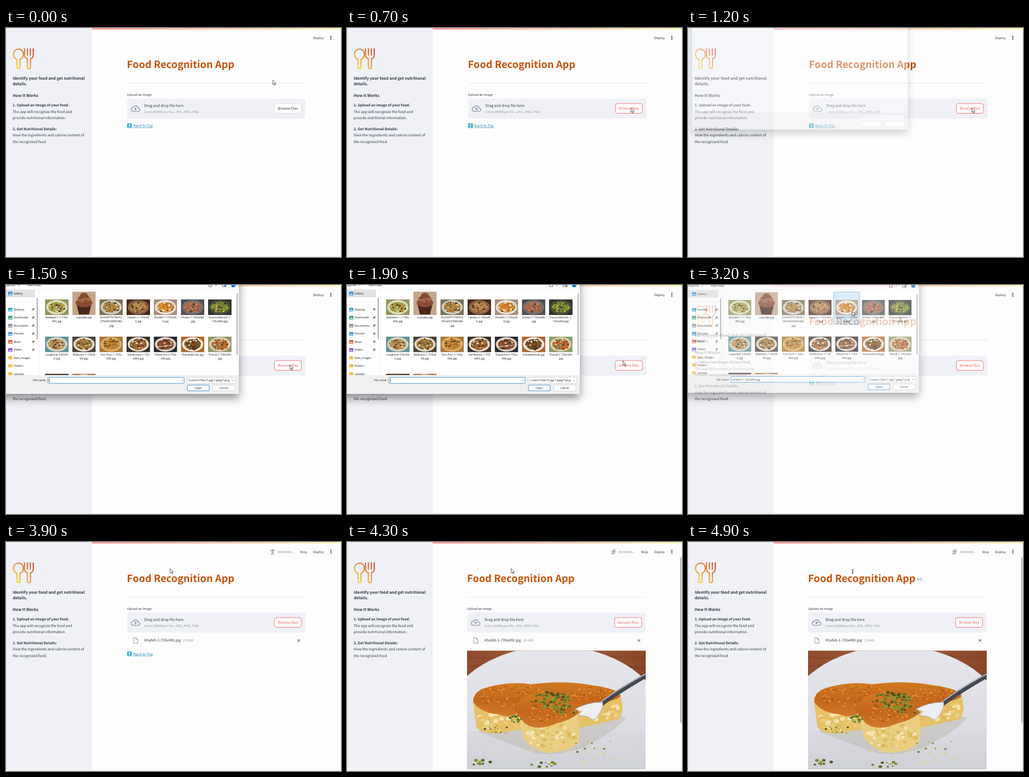
These frames come from a looping animation (600 by 412 pixels, 5000 ms). An HTML page:

```html
<!DOCTYPE html>
<html lang="en">
<head>
<meta charset="utf-8">
<title>Food Recognition App</title>
<style>
  html, body { margin: 0; height: 100%; overflow: hidden; background: #fff; }
  svg { text-rendering: geometricPrecision; }
  #stage { display: block; width: 100vw; height: 100vh; }
  text { font-family: "Noto Sans CJK JP", "Noto Sans CJK SC", "Noto Sans CJK", Lato, sans-serif; fill: #31333f; }
  #dialog text { font-family: "Open Sans", "Noto Sans", sans-serif; font-size: 5px; fill: #111; }
  #frame { filter: drop-shadow(0 8px 8px rgba(0, 0, 0, .42)); }
</style>
</head>
<body>
<svg id="stage" viewBox="0 0 600 412"></svg>
<script>
const BODY = 6.45, SMALL = 5.62, GREY = '#91949c', RED = '#f05a5a';

const text = (x, y, str, size = BODY, attrs = '') =>
  `<text x="${x}" y="${y}" font-size="${size}" ${attrs}>${str}</text>`;
const bold = (x, y, str, size = 7.05) => text(x, y, str, size, 'font-weight="700"');
const rect = (x, y, w, h, fill, attrs = '') =>
  `<rect x="${x}" y="${y}" width="${w}" height="${h}" fill="${fill}" ${attrs}/>`;
const ellipse = (x, y, rx, ry, fill, attrs = '') =>
  `<ellipse cx="${x}" cy="${y}" rx="${rx}" ry="${ry}" fill="${fill}" ${attrs}/>`;
const path = (d, fill = 'none', stroke = 'none', width = 1, attrs = '') =>
  `<path d="${d}" fill="${fill}" stroke="${stroke}" stroke-width="${width}" ${attrs}/>`;
const group = (id, body, attrs = '') => `<g id="${id}" ${attrs}>${body}</g>`;

let seed = 7;
const random = () => (seed = (seed * 16807) % 2147483647) / 2147483647;

function specks(count, x, y, rx, ry, size, colours) {
  let out = '';
  for (let i = 0; i < count; i++) {
    const a = random() * 6.283, d = Math.sqrt(random()), r = size * (.5 + random());
    out += ellipse((x + Math.cos(a) * d * rx).toFixed(1), (y + Math.sin(a) * d * ry).toFixed(1),
      r.toFixed(2), (r * .75).toFixed(2), colours[i % colours.length]);
  }
  return out;
}

// ---- page ----
function sidebar() {
  const spoon = 'M19.6 56.5C10.5 53.5 11.5 38 22.3 38S34 53.5 25 56.5V70.5a2.7 2.7 0 0 1-5.4 0Z';
  const fork = 'M33.2 37.5V49q0 5 5 6.2V70.5a2.8 2.8 0 0 0 5.6 0V55.2q5-1.2 5-6.2V37.5M38.4 37.5V49M43.6 37.5V49';
  return rect(0, 0, 153.5, 411, '#eff1f6') +
    path(spoon + fork, 'none', 'url(#warm)', 2, 'stroke-linejoin="round" stroke-linecap="round"') +
    bold(12, 93, 'Identify your food and get nutritional') + bold(12, 103, 'details.') +
    bold(12, 123.6, 'How It Works') +
    bold(12, 141.4, '1. Upload an image of your food.', 6.35) +
    text(12, 152.8, 'The app will recognize the food and') +
    text(12, 164.3, 'provide nutritional information.') +
    bold(12, 183.6, '2. Get Nutritional Details:', 6.35) +
    text(12, 195, 'View the ingredients and calorie content of') +
    text(12, 206.6, 'the recognized food.');
}

const CLOUD = 'M19.35 10.04A7.49 7.49 0 0 0 12 4C9.11 4 6.6 5.64 5.35 8.04A6 6 0 0 0 0 14c0 3.31 2.69 6 6 6h13' +
  'c2.76 0 5-2.24 5-5 0-2.64-2.05-4.78-4.65-4.96zM19 18H6c-2.21 0-4-1.79-4-4 0-2.05 1.53-3.76 3.56-3.97' +
  'l1.07-.11.5-.95A5.47 5.47 0 0 1 12 6c2.62 0 4.88 1.86 5.39 4.43l.3 1.5 1.53.11A2.98 2.98 0 0 1 22 15' +
  'c0 1.65-1.35 3-3 3zM8 13h2.55v3h2.9v-3H16l-4-4z';

function content() {
  const link = '<g fill="none" stroke="#8d9097" stroke-width=".9">' +
    '<path d="M415 65.2h-1.6a1.9 1.9 0 0 0 0 3.8h1.6M417 65.2h1.6a1.9 1.9 0 0 1 0 3.8H417M414 67.1h4"/></g>';
  return text(216.6, 72, 'Food Recognition App', 17.9, 'font-weight="700" style="fill:#c7520c"') +
    group('anchor', link) +
    rect(217, 99, 319, .8, '#dfe0e5') +
    text(216.6, 122, 'Upload an image', SMALL) +
    rect(216.6, 127, 319.6, 36, '#eff1f6', 'rx="3.5"') +
    path(CLOUD, '#959cac', 'none', 0, 'transform="translate(223.4 136.4) scale(.71)"') +
    text(247.8, 142.3, 'Drag and drop file here', 6.6) +
    text(247.8, 153.2, 'Limit 200MB per file • JPG, JPEG, PNG', SMALL, `style="fill:${GREY}"`) +
    rect(480.8, 136, 48.3, 17.5, '#fff', 'id="button" rx="3.4" stroke-width=".8"') +
    text(505, 147.3, 'Browse files', BODY, 'id="buttonText" text-anchor="middle"') +
    group('file',
      path('M228.4 172.2h4.6l3 3v7h-7.6zM232.8 172.2v3.2h3.2', 'none', '#959cac', 1) +
      text(247.8, 179.4, 'Khafeh-1-735x490.jpg') +
      text(317.3, 179.4, '22.6KB', SMALL, `style="fill:${GREY}"`) +
      path('M522 175l4.6 4.6m0-4.6l-4.6 4.6', 'none', '#31333f', 1)) +
    group('backLink',
      rect(217, 171.5, 8.4, 8.6, '#35aecb', 'rx="1"') +
      path('M221.2 172.6l2 2.3h-1.3v2.3h-1.4v-2.3h-1.3z', '#fff') +
      rect(218.4, 178, 5.6, .8, '#d8f2f8') +
      text(228, 178.2, 'Back to Top', BODY, 'style="fill:#1a80b5" text-decoration="underline"')) +
    group('photo', photo());
}

function photo() {
  const greens = ['#5d6d22', '#7d8a2e', '#46551a', '#8f9638'];
  const baked = ['#dd8a2c', '#b4560f', '#e09638', '#c66a18'], crumb = ['#f4e4b0', '#dfbc63', '#ecd080'];
  return '<svg x="216.5" y="195.5" width="320" height="213" viewBox="215 195.5 320 213">' +
    rect(215, 195, 320, 214, 'url(#wood)') +
    path('M215 206q50 9 90-8M440 198q45 14 95 8M215 224l44-4M478 222l57 6', 'none', '#6b301b', 1.2, 'opacity=".5"') +
    ellipse(371, 332, 200, 145, 'url(#plate)') + rect(215, 340, 320, 70, 'url(#plateBase)') +
    path('M236 342Q300 366 316 372Q350 392 418 372Q480 342 500 316L430 300L250 310Z', '#b9b3a8', 'none', 0, 'opacity=".45"') +
    path('M226 288Q226 268 250 262Q290 250 330 256Q390 248 440 258Q486 264 490 277Q497 302 488 318L450 327L410 336L316 336L288 341Q250 350 232 334Z', '#e6c165') +
    specks(40, 268, 322, 36, 17, 3.4, crumb) + specks(35, 458, 304, 32, 16, 3.4, crumb) +
    path('M226 288Q226 268 250 262Q290 250 330 256Q390 248 440 258Q486 264 490 277Q480 288 440 290L410 300L304 308Q290 318 272 310Q240 308 226 288Z', 'url(#crust)') +
    specks(150, 300, 278, 64, 20, 1.7, baked) + specks(70, 440, 273, 45, 12, 1.7, baked) +
    path('M303 304L412 309Q421 340 412 364Q388 380 356 379Q328 372 316 352Z', '#e9cd80') +
    specks(75, 365, 350, 43, 22, 3.4, crumb) +
    path('M300 303Q306 280 330 274Q386 270 416 307Q398 322 376 326Q340 342 318 326Z', 'url(#crust)') +
    specks(110, 355, 305, 44, 20, 1.6, baked) +
    path('M538 239Q490 266 452 294', 'none', '#44474d', 8) +
    path('M538 236Q488 262 452 290', 'none', '#a9adb4', 2.2) +
    path('M458 288Q430 288 408 301L420 305L414 312L430 314L440 320Q450 318 458 296Z', '#eceef1', '#8d9299', .7) +
    specks(110, 366, 286, 38, 16, 2.2, greens) + specks(25, 392, 302, 18, 10, 2, greens) +
    specks(22, 302, 318, 10, 7, 2, greens) + specks(12, 270, 338, 24, 8, 1.6, greens) +
    specks(12, 360, 401, 30, 6, 2.2, greens) + specks(12, 242, 398, 16, 9, 2.4, greens) +
    specks(10, 425, 365, 50, 18, 1.6, greens) + specks(30, 400, 384, 90, 18, 2, ['#d9cf9c', '#ddd6b0']) + '</svg>';
}

function header() {
  return text(550, 20, 'Deploy', 5.8) +
    [14.9, 17.6, 20.3].map(y => ellipse(581.8, y, 1, 1, '#31333f')).join('') +
    group('running',
      group('man', '') + text(487, 20, 'RUNNING...', SMALL, `style="fill:${GREY}"`) + text(526.5, 20, 'Stop', 5.8)) +
    rect(596.6, 28, 2.6, 297, '#b3b5ba', 'id="scrollbar" rx="1.3"');
}

// ---- file dialog ----
const COLUMN = 48.65;
// label lines | background, plate, food, garnish
const PICTURES = [
  'Balaleet-1-1-735x/490.jpg|#8f9658 #e0dcc4 #b5a044 #6f8f35',
  'cupcake.jpg|#c4a68c #d5bda6 #8a4d32 #a3674a',
  'DLPGFPTVTRVFO/ZPH4I5YXW43RA/.jpg|#7a7050 #cdd0c8 #b5803a #6d7434',
  'Harees-1-735x49/0.jpg|#45291d #8a6040 #b98a52 #5a3522',
  'Khafeh-1-735x49/0.jpg|#a98f7c #e6e3de #d88f2e #c06a1c',
  'Khubz-1-735x486/.jpg|#4f4d50 #77706c #a8664a #c48a70',
  'Kousa-Mahshi-1-/735x490.jpg|#2f352c #48533c #7d8c34 #c9bb4a',
  'Luqaimat-720x54/0.jpg|#5f9297 #d8d4c4 #b98f50 #85623a',
  'Majboos-1-735x4/90.jpg|#4a4339 #e4ddd0 #a5752f #5d6430',
  'Puri-Puri-1-735x/490.jpg|#a87838 #dbb06a #c08432 #8a5220',
  'Samboosa-1-735/x493.jpg|#3a3028 #e4ded2 #a8652a #6d5a34',
  'Shwarma-1-735x/490.jpg|#2c2a30 #e0d8cc #84482a #b98a58',
  'thareedsmall.jpg|#b4652e #f0ece4 #80501f #4a3418',
  'Tharid-1-735x504/.jpg|#8f9a68 #dcd0b4 #bf6a34 #637f34',
  '|#4a3028 #5d3c30 #7a4e3a #9b6a50',
  '|#a8744c #e0d0a8 #c8a048 #84502c'
];

function thumbnail(entry, i) {
  const [label, colours] = entry.split('|'), [back, plate, food, garnish] = colours.split(' ');
  const cx = 91 + (i % 7) * COLUMN, row = Math.floor(i / 7), tall = i === 1;
  const top = tall ? 12 : 26 + row * 66.8;
  const dish = tall
    ? path('M8 24h26l-4 17H12z', '#4a271a') + ellipse(21, 20, 15, 8, food) + ellipse(21, 13, 12, 6, garnish) + ellipse(21, 7, 7, 5, food)
    : ellipse(21, 14, 19, 13, plate) + ellipse(21, 14, 15, 9.5, food);
  const garnishes = tall ? specks(20, 21, 15, 12, 8, 1.2, [garnish, '#6b3822'])
    : specks(45, 21, 14, 15, 10, 1.5, [garnish, food, plate, '#4a321e']);
  const image = `<svg x="${cx - 21}" y="${top}" width="42" height="${tall ? 42 : 28}">` +
    rect(0, 0, 42, 42, back) + dish + garnishes + '</svg>';
  return image + label.split('/').map((line, n) =>
    text(cx, 60.2 + row * 66.8 + n * 7.2, line, 5, 'text-anchor="middle"')).join('');
}

function dialog() {
  const places = [['Gallery', 15, '#2f8fd6'], ['Desktop', 44, '#25a3d6'], ['Downloads', 58.5, '#2f9a6a'],
    ['Documents', 73, '#7f8ba0'], ['Pictures', 87.5, '#3a8fd8'], ['Music', 102, '#e0553c'],
    ['Videos', 116.5, '#8a4ad0'], ['Data_Images', 131, '#f2c24a'], ['Posters', 145.5, '#f2c24a'], ['uploads', 160, '#f2c24a']];
  const list = rect(-6, 8.5, 58, 13.5, '#e2e2e4') + rect(0, 29.8, 52, .6, '#e3e3e3') +
    places.map(([name, y, colour], i) =>
      rect(4, y - 3, 7.4, i > 6 ? 5.6 : 6.4, colour, 'rx="1"') +
      (i > 6 ? '' : path(`M5 ${y + 2.2}l2-2.6 1.4 1.4 1-.8 1.4 2z`, '#fff', 'none', 0, 'opacity=".85"')) +
      text(13.4, y + 1.8, name) +
      (i > 0 && i < 7 ? path(`M47.4 ${y - 1.4}l2.6 2.6m-1.2-3.2l2 2m-2.6.6l-1.4 1.6`, 'none', '#555', 1.1) : '')).join('');
  const toolbar = text(-4, 2.3, 'Organize') + path('M21.5 0l1.5 1.5 1.5-1.5', 'none', '#333', .6) + text(38, 2.3, 'New folder') +
    rect(363.5, -3, 5, 6, 'none', 'stroke="#444" stroke-width=".8"') + path('M374.5 0l1.5 1.5 1.5-1.5', 'none', '#333', .6) +
    rect(387.6, -3, 6.4, 6, 'none', 'stroke="#444" stroke-width=".8"') + rect(391, -3, 3, 6, '#3a8fd8') +
    ellipse(407, .4, 3.8, 3.8, '#1679cf') + rect(-16, 7.6, 433, .6, '#e6e6e6');
  const bars = rect(59.2, 8, .6, 154, '#e6e6e6') + rect(55.2, 23, 1.5, 75, '#8f8f8f', 'rx=".7"') +
    rect(413.2, 15, 1.5, 111, '#9a9a9a', 'rx=".7"');
  const box = (x, y, w, h, line, fill = '#fff') => rect(x, y, w, h, fill, `stroke="${line}" stroke-width=".8" rx="1"`);
  const footer = rect(-16, 162, 433, 34, '#f0f0f0') +
    box(324.5, 166.2, 86.5, 10.8, '#d0d0d0') + box(325, 180, 39, 10.4, '#d0d0d0') + box(370.5, 180, 39.5, 10.4, '#d0d0d0');
  const captions = box(75, 166.2, 244, 10.8, '#2a86cf') + box(325, 180, 39, 10.4, '#2a86cf', '#fcfdff') +
    text(72, 173.4, 'File name:', 5, 'text-anchor="end"') + text(327, 173.4, 'Custom Files (*.jpg;*.jpeg;*.png') +
    path('M313.5 170.8l1.6 1.6 1.6-1.6M404.8 170.8l1.6 1.6 1.6-1.6', 'none', '#555', .7) +
    text(344.5, 187, 'Open', 5, 'text-anchor="middle"') + text(390, 187, 'Cancel', 5, 'text-anchor="middle"') +
    text(77.5, 173.3, 'Khafeh-1-735x490.jpg', 5, 'id="fileName"') + rect(77, 168, .7, 7.2, '#222', 'id="caret"');
  return rect(-16, -56, 433, 252, '#fff', 'id="frame"') +
    group('listing', rect(0, 0, 47.4, 59, '#e0effb', 'id="hover" stroke-width=".7"') +
      toolbar + list + bars + PICTURES.map(thumbnail).join('')) +
    footer + group('captions', captions);
}

const gradient = (id, dir, ...stops) => `<linearGradient id="${id}" ${dir}>` +
  stops.map((c, i) => `<stop offset="${i / (stops.length - 1)}" stop-color="${c}"/>`).join('') + '</linearGradient>';
const DOWN = 'x1="0" y1="0" x2="0" y2="1"';

document.getElementById('stage').innerHTML =
  '<defs>' + gradient('warm', 'gradientUnits="userSpaceOnUse" x1="48" y1="37" x2="21" y2="70"', '#c5402b', '#e58a33', '#f3d03c') +
  gradient('rainbow', '', '#fb5555', '#fdf990') + gradient('wood', '', '#8f4b2e', '#a9623f', '#8a4528') +
  gradient('plate', DOWN, '#e6e7ec', '#dcdde3', '#d3d5db') + gradient('plateBase', DOWN, '#d9dae0', '#cfd1d7') +
  gradient('crust', DOWN, '#d07a22', '#c4661a', '#d0782a') + '</defs>' +
  rect(0, 0, 600, 412, '#fdfdfe') + sidebar() + group('content', content()) + header() +
  rect(.5, .5, 599, 410.5, 'none', 'stroke="#e2e3e6" stroke-width=".8"') +
  rect(153.5, .9, 446, 1.4, 'url(#rainbow)') +
  group('dialog', dialog()) +
  group('arrow', path('M0 0V8.2L1.9 6.5 3.2 9.4 4.6 8.8 3.3 6H5.7Z', '#fff', '#333', .75)) +
  group('beam', path('M293.4 49.4q1.7 0 1.7 1.2v5q0 1.2-1.7 1.2M296.8 49.4q-1.7 0-1.7 1.2v5q0 1.2 1.7 1.2', 'none', '#444', .8));

// ---- motion ----
const el = Object.fromEntries([...document.querySelectorAll('[id]')].map(e => [e.id, e]));
const show = (id, on) => el[id].setAttribute('visibility', on ? 'inherit' : 'hidden');
const set = (id, attrs) => Object.entries(attrs).forEach(([k, v]) => el[id].setAttribute(k, v));
const clamp = v => Math.max(0, Math.min(1, v));

const LOOP = 5000, STEP = 100;
const POINTER = [[0, 478, 93.6], [400, 508.6, 143.6], [1800, 508.6, 143.6], [2400, 314, 48], [2500, 314, 48], [2800, 294, 47.6]];
const POSES = [
  'M478.6 15.6L476.6 19L479 20.6L478 23M476.6 19L474.4 21.6L473 21.4M478.4 15.8L475.4 15.6L474.4 17.6M478.4 15.8L480 18L482 17.2',
  'M473.4 15.6H481.4M477.4 15.6V19M476.6 18.6L475.8 23M478.2 18.6L479 23'
];

function pointerAt(t) {
  const i = POINTER.findLastIndex(p => p[0] <= t), a = POINTER[i], b = POINTER[i + 1];
  if (!b) return [a[1], a[2]];
  const p = (t - a[0]) / (b[0] - a[0]), e = p * p * (3 - 2 * p);
  return [a[1] + (b[1] - a[1]) * e, a[2] + (b[2] - a[2]) * e];
}

function drawDialog(t, x, y) {
  const opening = clamp((t - 1100) / 250), closing = clamp((t - 3150) / 180);
  const scale = 1 - .3 * (1 - opening) ** 2 - .06 * closing;
  const loaded = opening === 1, chosen = t >= 2900;
  const visible = opening > 0 && closing < 1;
  show('dialog', visible);
  set('dialog', { opacity: opening * (1 - closing), transform: `translate(200.5 70) scale(${scale}) translate(-200.5 -70)` });
  show('listing', loaded);
  show('captions', loaded);
  show('fileName', loaded && chosen);
  show('caret', loaded && !chosen);
  for (const id of ['listing', 'captions', 'fileName', 'caret']) if (!visible) show(id, false);
  const column = Math.floor((x - 66.7) / COLUMN), row = Math.floor((y - 11) / 66.8);
  show('hover', visible && loaded && column >= 0 && column < 7 && row < 2);
  set('hover', { x: 67.3 + column * COLUMN, y: 11.4 + row * 66.8,
    fill: chosen ? '#cfe6f9' : '#e0effb', stroke: chosen ? '#6aa5d4' : 'none' });
}

function draw(t) {
  const [x, y] = pointerAt(t), active = t >= 300, uploaded = t >= 3600, pictured = t >= 4300, onTitle = t >= 4700;
  set('button', { stroke: active ? RED : '#d4d6db' });
  el.buttonText.style.fill = active ? RED : '#31333f';
  show('running', t >= 3500);
  const pose = t < 3500 ? 0 : Math.floor((t - 3500) / 300) % 2;
  el.man.innerHTML = ellipse(pose ? 477.4 : 479.4, 13.6, 1.2, 1.2, '#85878d') + path(POSES[pose], 'none', '#85878d', 1.2);
  show('file', uploaded);
  show('backLink', !pictured);
  set('backLink', { transform: `translate(0 ${uploaded ? 25.5 : 0})` });
  show('photo', pictured);
  show('scrollbar', pictured);
  set('content', { transform: `translate(${pictured ? -1.5 : 0} 0)` });
  show('anchor', onTitle);
  show('beam', onTitle);
  show('arrow', !onTitle);
  set('arrow', { transform: `translate(${x} ${y})` });
  drawDialog(t, x, y);
}

const start = performance.now();
function tick() {
  const t = (performance.now() - start) % LOOP;
  draw(Math.floor(t / STEP) * STEP);
  requestAnimationFrame(tick);
}
tick();
</script>
</body>
</html>
```
